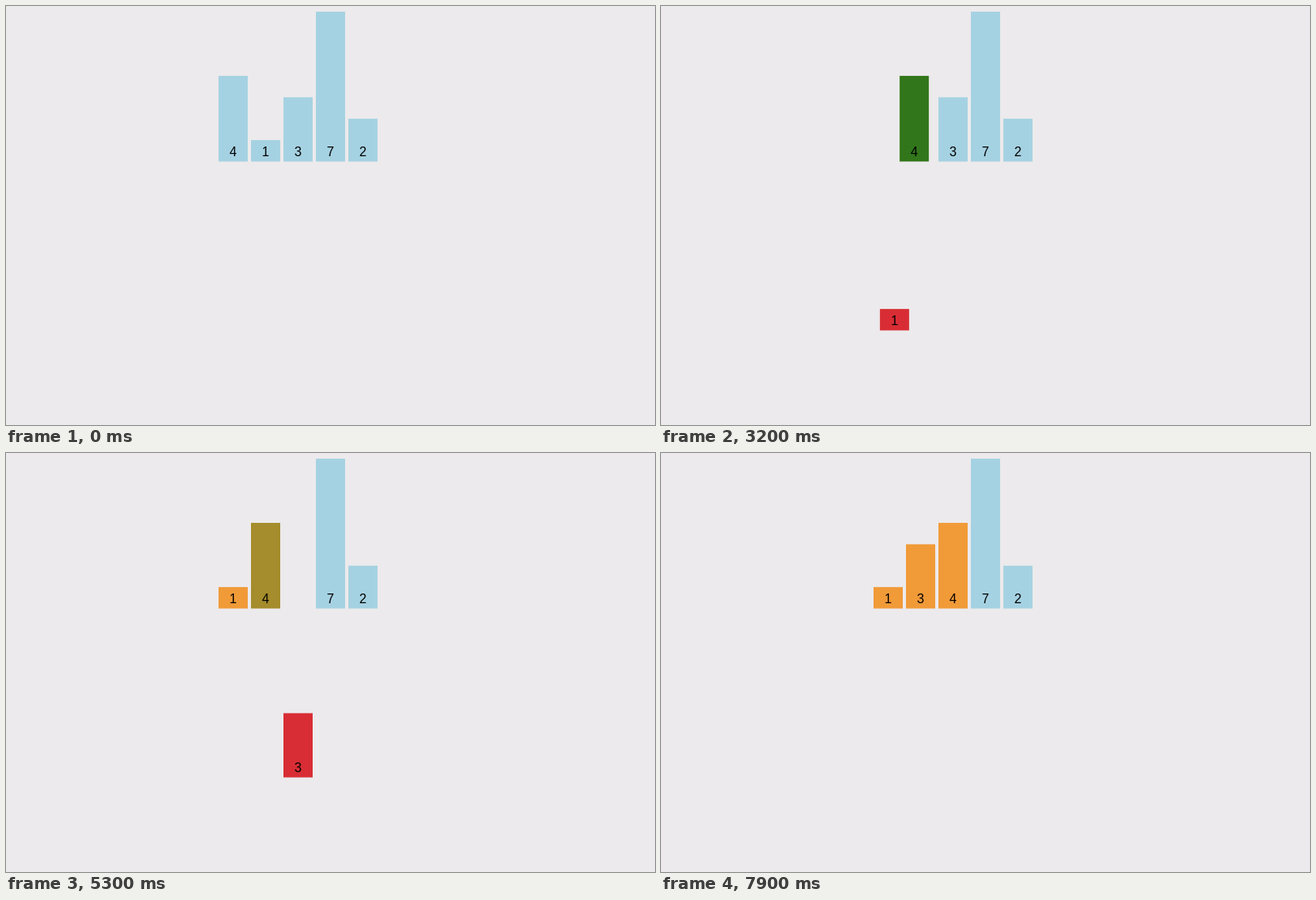
An HTML page for the animation above (8000 ms loop, 800x516 px).

```html
<!DOCTYPE html>
<html lang="en">
<head>
<meta charset="utf-8">
<title>Insertion sort</title>
<style>
  html, body { margin: 0; width: 100%; height: 100%; overflow: hidden; background: #eceaec; }
  svg { display: block; width: 100%; height: 100%; }
  text { font: 16px "Liberation Sans", Arial, sans-serif; text-anchor: middle; fill: #000; }
</style>
</head>
<body>
<svg id="stage" viewBox="0 0 800 516"></svg>
<script>
const LOOP = 8000, STEP = 500;
const LEFT = 262, PITCH = 40, WIDTH = 36, BASE = 191.5, UNIT = 26.36, DROP = 208;
const BLUE = [165, 210, 226], ORANGE = [241, 154, 56], GREEN = [50, 118, 27], RED = [216, 45, 52];

// Each move: start time, the values it changes, optional duration.
const bars = [
  { value: 4, slot: 0, moves: [
    [850, { color: ORANGE }],
    [2222, { color: GREEN }],
    [2884, { slot: 1 }],
    [3715, { color: ORANGE }, 400],
    [5069, { color: GREEN }],
    [5730, { slot: 2 }],
    [6590, { color: ORANGE }]
  ] },
  { value: 1, slot: 1, moves: [
    [1562, { color: RED, drop: 1 }],
    [2884, { slot: 0 }],
    [3715, { color: ORANGE, drop: 0 }, 400],
    [6590, { color: GREEN }],
    [7250, { color: ORANGE }]
  ] },
  { value: 3, slot: 2, moves: [
    [4409, { color: RED, drop: 1 }],
    [5730, { slot: 1 }],
    [7250, { color: ORANGE, drop: 0 }]
  ] },
  { value: 7, slot: 3, moves: [] },
  { value: 2, slot: 4, moves: [] }
];

const cubicInOut = t => t < 0.5 ? 4 * t ** 3 : 1 - 4 * (1 - t) ** 3;
const mix = (a, b, k) => Array.isArray(a) ? a.map((v, i) => mix(v, b[i], k)) : a + (b - a) * k;

function add(tag, parent, attrs) {
  const el = document.createElementNS("http://www.w3.org/2000/svg", tag);
  for (const key in attrs) el.setAttribute(key, attrs[key]);
  return parent.appendChild(el);
}

for (const bar of bars) {
  const height = bar.value * UNIT;
  bar.group = add("g", document.getElementById("stage"), {});
  bar.rect = add("rect", bar.group, { y: -height, width: WIDTH, height });
  add("text", bar.group, { x: WIDTH / 2, y: -6.2 }).textContent = bar.value;
}

function stateAt(bar, time) {
  const state = { slot: bar.slot, drop: 0, color: BLUE };
  for (const [start, change, length = STEP] of bar.moves) {
    if (time <= start) break;
    const k = cubicInOut(Math.min(1, (time - start) / length));
    for (const key in change) state[key] = mix(state[key], change[key], k);
  }
  return state;
}

function draw(time) {
  for (const bar of bars) {
    const { slot, drop, color } = stateAt(bar, time);
    bar.group.setAttribute("transform", `translate(${LEFT + slot * PITCH} ${BASE + drop * DROP})`);
    bar.rect.setAttribute("fill", `rgb(${color.map(Math.round)})`);
  }
}

const begin = performance.now();
function tick() {
  draw((performance.now() - begin) % LOOP);
  requestAnimationFrame(tick);
}
tick();
</script>
</body>
</html>
```
